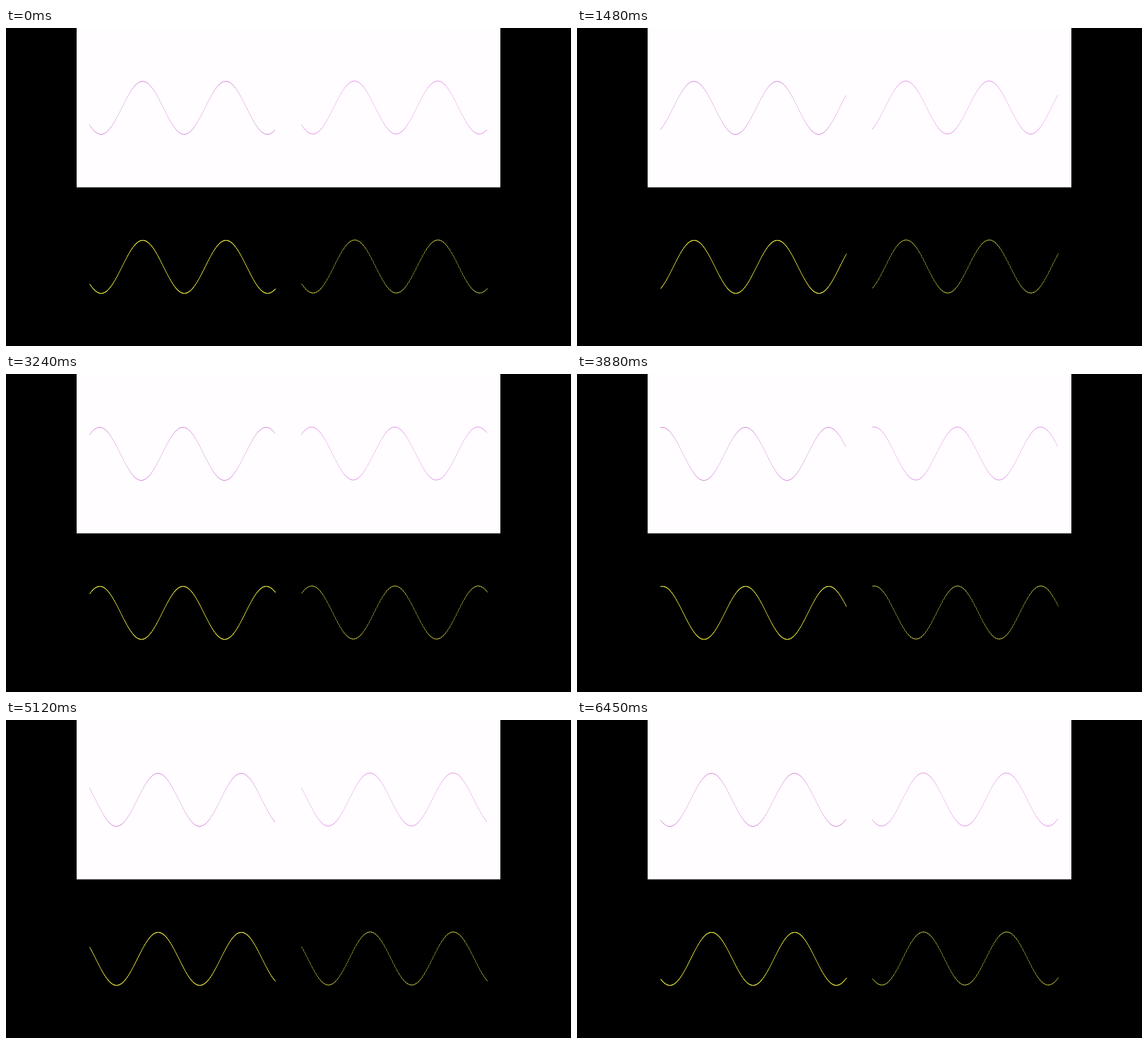
Write an HTML page with a canvas that moves like this. It is 800x450 px and loops after 6480 ms.

```html
<!DOCTYPE html>
<html lang="en">
<head>
<meta charset="utf-8">
<title>Four sine waves</title>
<style>
html, body { margin: 0; width: 100%; height: 100%; overflow: hidden; background: #000; }
canvas { display: block; }
</style>
</head>
<body>
<canvas width="800" height="450"></canvas>
<script>
const ctx = document.querySelector('canvas').getContext('2d');
const LOOP = 6480, FPS = 33, FRAMES = 214, START_PHASE = 4.575;

// Each wave: panel centre, colour, and spacing of its soft dots in pixels.
const waves = [
  { cx: 250, cy: 113, color: '#d88cdc', step: 1 },
  { cx: 550, cy: 112.5, color: '#e696ea', step: 1 },
  { cx: 250, cy: 338, color: '#dcdc3c', step: 0.5 },
  { cx: 550, cy: 337.5, color: '#b0b03a', step: 0.75 }
];

const frameTime = k => Math.round(k * 100 / FPS) * 10;

function frameAt(ms) {
  let k = Math.min(FRAMES - 1, Math.ceil(ms * FPS / 1000) + 1);
  while (k > 0 && frameTime(k) > ms) k--;
  return k;
}

function drawWave({ cx, cy, color, step }, phase) {
  ctx.fillStyle = color;
  for (let dx = -131.25; dx <= 131.25; dx += step) {
    const y = cy - 37.5 * Math.sin(8 * dx / 150 + phase);
    ctx.fillRect(Math.floor(cx + dx), y - 0.5, 1, 1);
  }
}

function draw(ms) {
  const phase = START_PHASE + frameAt(ms) / FPS;
  ctx.fillStyle = '#000';
  ctx.fillRect(0, 0, 800, 450);
  ctx.fillStyle = '#fffdff';
  ctx.fillRect(100, 0, 600, 225.5);
  waves.forEach(wave => drawWave(wave, phase));
}

const start = performance.now();
function tick() {
  draw((performance.now() - start) % LOOP);
  requestAnimationFrame(tick);
}
tick();
</script>
</body>
</html>
```
